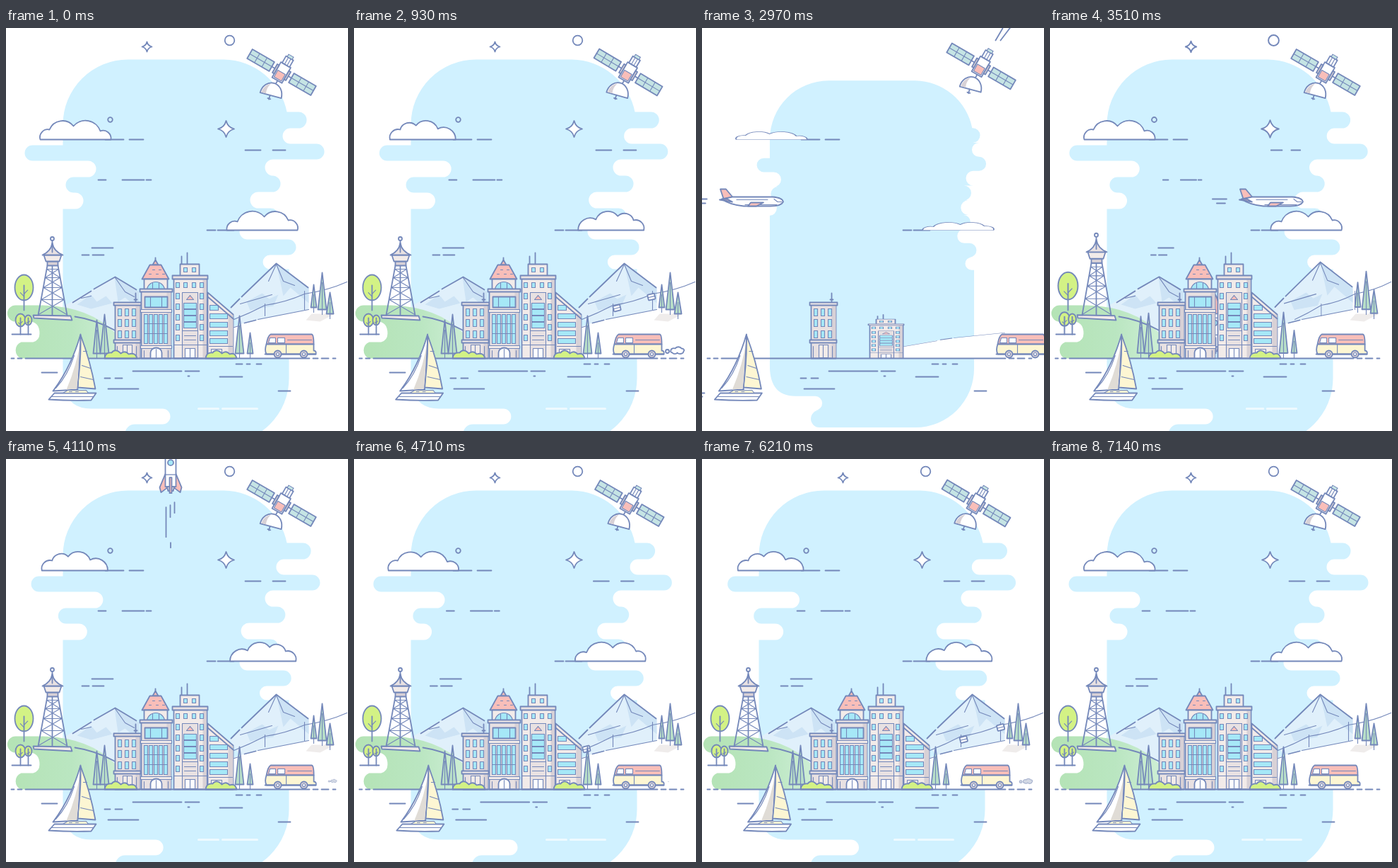
These frames come from a looping animation (484x569 px, 7.17 s). An HTML page:

```html
<!DOCTYPE html>
<html lang="en">
<head>
<meta charset="utf-8">
<title>City by the bay</title>
<style>
html, body { margin: 0; width: 100%; height: 100%; overflow: hidden; background: #fff; }
svg { display: block; width: 484px; height: 569px; fill: none; stroke: #7488ba; stroke-width: 1.8; stroke-linecap: round; stroke-linejoin: round; }
.thin { stroke-width: 1.1; }
.flat { stroke: none; }
.sky { fill: #d0f1ff; }
.white { fill: #fff; }
.wall { fill: #e8e1e2; }
.pale { fill: #f2ebe9; }
.shade { fill: #d8d1d6; }
.glass { fill: #a6e8f7; }
.pink { fill: #f9beb9; }
.cream { fill: #fdf6d3; }
.leaf { fill: #d3f285; }
.pine { fill: #b8dfc8; }
.snow { fill: #e0f0fb; }
.ice { fill: #cde3f5; }
.panel { fill: #c5e4e4; }
.sail { fill: #e0dcd6; }
.sand { fill: #efeceb; }
.meadow { fill: url(#meadow); }
</style>
</head>
<body>
<svg id="stage" viewBox="-.5 -.5 484 569"></svg>
<script>
const LOOP = 7170, SWAY = 2700, CUT = 2480, SETTLED = 4470;
const stage = document.getElementById('stage');

const line = (y, ...xs) => {
  let d = '';
  for (let i = 0; i < xs.length; i += 2) d += `M${xs[i]} ${y}H${xs[i + 1]}`;
  return `<path d="${d}"/>`;
};
const rect = (c, x, y, w, h, r = 0) => `<rect class="${c}" x="${x}" y="${y}" width="${w}" height="${h}" rx="${r}"/>`;
const path = (c, d) => `<path class="${c}" d="${d}"/>`;
const dot = (c, x, y, r) => `<circle class="${c}" cx="${x}" cy="${y}" r="${r}"/>`;
const grid = (c, xs, ys, w, h) => ys.map(y => xs.map(x => rect(c, x, y, w, h)).join('')).join('');
const group = (id, body) => `<g id="${id}">${body}</g>`;
// mode: y = grow upward, x = widen, s = scale both ways
const enter = (start, mode, x, y, body) =>
  `<g data-start="${start}" data-mode="${mode}" data-x="${x}" data-y="${y}">${body}</g>`;

const star = (x, y, r) => {
  const k = r * .2;
  return path('white', `M${x} ${y - r}Q${x + k} ${y - k} ${x + r} ${y}Q${x + k} ${y + k} ${x} ${y + r}Q${x - k} ${y + k} ${x - r} ${y}Q${x - k} ${y - k} ${x} ${y - r}Z`);
};
const pine = (x, top, base, w) => enter(3180 + x % 7 * 25, 'y', x, base,
  path('pine', `M${x} ${top}L${x + w} ${base - 7}H${x - w}Z`) + path('thin', `M${x} ${top + 14}V${base}`));
const tree = (x, y, rx, ry, base) => enter(3300, 's', x, base,
  `<ellipse class="leaf" cx="${x}" cy="${y}" rx="${rx}" ry="${ry}"/>` +
  path('', `M${x} ${y - 3}V${base}`) +
  path('thin', `M${x} ${y + ry * .5}l${rx * .4} ${-ry * .3}M${x} ${y + ry * .7}l${-rx * .4} ${-ry * .3}`));

const mountains =
  enter(3080, 'y', 140, 410,
    path('flat snow', 'M78 394L153 351L188 372V430H150L78 410Z') +
    path('flat ice', 'M153 351L188 372V397L168 380L158 386Z') +
    path('flat ice', 'M100 390L120 376L128 386L141 378L150 388L120 396Z') +
    path('', 'M94 387L120 371M124 368L154 351L184 369') + path('thin', 'M154 352L168 372L181 379M106 381L120 378')) +
  enter(3120, 'y', 375, 415,
    path('flat snow', 'M316 396L382 332L428 366V405L330 418Z') +
    path('flat ice', 'M382 332L428 366V388L402 366L392 378Z') +
    path('flat ice', 'M340 386L362 374L372 382L385 376L378 392L345 398Z') +
    path('', 'M318 394L330 382M333 379L382 332L427 366') + path('thin', 'M382 333L392 357L408 363M382 333L371 357M331 389L376 376'));

const hills =
  enter(3050, 'y', 75, 466,
    path('flat meadow', 'M13 391H52Q118 393 154 430V466H21A11 12 0 0 1 21 443H38Q47 440 47 431Q47 414 32 414H13A11 11 0 0 1 13 391Z') +
    path('', 'M97 407Q125 411 153 426M8 432H35')) +
  enter(2910, 'y', 380, 466,
    path('flat white', 'M284 466V434L340 415L428 397L482 385V466Z') +
    path('thin', 'M285 434L332 419M356 411L428 397') + path('', 'M337 416L353 412') +
    path('flat sand', 'M424 412L432 403H465L444 414Z'));

const lattice = [340, 352, 366, 383].map((y, i) => {
  const h = [12, 14, 17, 21][i], a = (y - 335) * .18, b = (y + h - 335) * .18;
  return `M${58 - a} ${y}L${73 + b} ${y + h}M${73 + a} ${y}L${58 - b} ${y + h}M${58 - a} ${y}H${73 + a}`;
}).join('');
const tower = enter(3150, 'y', 65, 411,
  path('pale', 'M38 405L91 406L93 412L39 409Z') + path('', 'M58 335L45 405M73 335L86 405M65 335V405') + path('thin', lattice) +
  rect('shade', 58, 329, 15, 6) + path('pale', 'M53 320H78L75 329H56Z') + path('wall', 'M65 303Q63 315 51 320H80Q67 315 65 303Z') +
  path('', 'M65 300V316') + dot('white', 65, 297, 2.5));

const cable = enter(3300, 'x', 482, 400,
  path('thin', 'M322 411Q345 402 366 391Q395 387 422 375Q455 370 482 358M366 406V389M422 397V371'));

const b1 = enter(2520, 'y', 171, 466,
  path('', 'M183 387V374M181 383H185') + rect('wall', 154, 390, 35, 76) + rect('flat shade', 183, 391, 6, 74) +
  rect('pale', 152, 387, 39, 4) + grid('glass thin', [158, 168, 178], [396, 411, 427], 5, 10) +
  rect('pale', 152, 440, 38, 4) + rect('pale thin', 165, 447, 13, 18) + path('thin', 'M171 447V465M157 449V465M184 449V465'));

const b2 = enter(3010, 'y', 212, 466,
  path('', 'M211 334V324') + path('pink', 'M211 327L215 334H207Z') + path('pink', 'M203 334H219L230 354H192Z') +
  path('thin', 'M207 341h3M216 341h3M202 347h3M212 347h3M221 347h3') +
  rect('pale', 195, 354, 33, 16) + path('glass thin', 'M199 370a12.5 12 0 0 1 25 0Z') + path('thin', 'M207 359V370M216 359V370') +
  rect('wall', 191, 371, 42, 95) + rect('flat shade', 227, 372, 6, 93) + rect('pale', 189, 368, 46, 4) +
  rect('glass', 196, 379, 32, 15) + path('thin', 'M204 379V394M220 379V394') + rect('pale thin', 190, 397, 44, 4) +
  grid('glass thin', [195, 202, 209, 216, 223], [404], 5, 41) + path('thin', 'M195 417H228M195 431H228') +
  rect('pale thin', 190, 448, 44, 4) + path('white', 'M204 465V458a8 7 0 0 1 16 0V465') + path('thin', 'M212 453V465M195 455V465M229 455V465'));

const wing = enter(3060, 'y', 303, 466,
  path('pale', 'M285 373L321 404V466H285Z') + path('flat shade', 'M314 402L321 405V465H314Z') +
  [391, 403, 415, 427, 438].map((y, i) => path('glass thin', `M288 ${y}H${i ? 313 : 300}V${y + 7}H288Z`)).join('') +
  path('', 'M285 379L321 410') + path('thin', 'M287 449H320') + rect('pale thin', 290, 453, 15, 12));

const b3 = enter(2925, 'y', 260, 466,
  path('', 'M248 333V322M256 332V317') + rect('pale', 246, 333, 27, 17) +
  grid('glass thin', [251, 263], [338], 5, 6) + rect('pale', 237, 353, 47, 113) + rect('flat shade', 278, 355, 5, 110) +
  rect('wall', 235, 349, 50, 5) + grid('glass thin', [240, 251, 263, 274], [359], 5, 7) +
  grid('glass thin', [240, 274], [374, 389, 404, 418, 433], 5, 8) +
  rect('wall thin', 249, 373, 22, 92) + path('pink thin', 'M260 377L265 383H255Z') +
  grid('glass thin', [251], [388, 397, 406, 415], 18, 8) + path('thin', 'M249 427H271M252 434H268M252 440H268M237 447H284') +
  rect('white thin', 253, 452, 14, 13) + path('thin', 'M260 452V465'));

const bush = (x, w) => enter(3350, 'y', x, 466,
  path('leaf', `M${x - w} 466q1-9 10-8q5-7 13 1q6-5 11 1q${w * 2 - 36}-3 ${w * 2 - 34} 6Z`));

const boat =
  path('cream', 'M105 433Q119 470 126 509L101 507Z') +
  path('white', 'M105 432Q92 478 66 512L100 510Q106 470 105 432Z') +
  path('flat sail', 'M105 440L100 509L85 510Q100 475 105 440Z') +
  path('thin', 'M105 432L101 515M109 456H114M107 476L119 480M105 492L123 496M70 508Q87 490 96 462') +
  path('white', 'M60 524L68 515H127L120 525Q90 526 60 524Z') + path('cream thin', 'M80 515L87 511H113L116 515Z') +
  path('thin', 'M65 520H123M89 513h4M98 513h4');

const van =
  path('pink', 'M374 432H432Q435 432 435 446H368Q370 434 374 432Z') +
  path('cream', 'M368 446H435V455Q439 455 438 460H368Q365 454 368 446Z') +
  path('white thin', 'M373 437H381V444H371Z') + rect('white thin', 384, 437, 10, 7) + path('thin', 'M398 440H432M396 446V459') +
  path('', 'M366 460H438') + dot('shade', 384, 460, 5) + dot('shade', 421, 460, 5) + dot('white thin', 384, 460, 2) + dot('white thin', 421, 460, 2);

const panel = x => rect('panel', x, -7.5, 36, 15) + path('thin', `M${x} 0h36M${x + 12}-7v14M${x + 24}-7v14`);
const craft = `<g transform="translate(389.5 62) rotate(30)">${path('', 'M-16 0H16M1 13V20')}${panel(-52)}${panel(16)}` +
  rect('white', -8, -12, 16, 25) + rect('pink thin', -6, 0, 12, 11) + rect('shade', -11, -7, 3, 14) + rect('shade', 8, -7, 3, 14) +
  rect('white', -6, -23, 12, 11) + rect('panel thin', -4, -27, 8, 4) + path('thin', 'M-2-23V-12M2-23V-12') +
  `<g transform="translate(3 36) rotate(-15)">${path('white', 'M-15.5 0A15.5 18 0 0 1 15.5 0Z')}${path('flat shade', 'M-14-1A15 17 0 0 1-4-16Q-9-8-7-1Z')}${path('', 'M-1 0V6M-3 5H1')}</g></g>`;

const plane =
  path('pink', 'M25 227H33L43 239L30 242Z') +
  path('white', 'M27 241L42 238H99Q113 239 114 245Q111 251 96 251H58Q38 249 27 241Z') +
  path('thin', 'M48 242H92M101 241L106 245H112M60 249H105') + path('pink', 'M68 246H86L76 251H64Z') + path('pink', 'M24 242L35 241L42 245Z') +
  path('', 'M6 241H-14M4 247H-8');

const rocket =
  path('pink', 'M225 57L217 76L219 83L227 77ZM240 57L248 76L246 83L238 77Z') +
  path('white', 'M225 75V28Q225 9 232.5 0Q240 9 240 28V75Z') + path('pink', 'M225 28Q226 9 232.5 0Q239 9 240 28Z') +
  path('shade', 'M227 75H238L236 81H229Z') + dot('glass', 232.5, 41, 4) + path('thin', 'M225 34H240M225 58H240') + path('pink', 'M231 62H234V84H231Z') +
  path('', 'M226 104V146M232 101V118M238 97V112M232.5 154V161');

const car = id => group(id, `<g transform="rotate(-14)">${rect('white', -5, -2, 10, 8, 1)}${path('thin', 'M-5 2H5')}</g>`);

stage.innerHTML =
  `<defs><linearGradient id="meadow"><stop stop-color="#b4e3b5"/><stop offset=".6" stop-color="#bae6c1"/><stop offset="1" stop-color="#cdeed4"/></linearGradient>
  <clipPath id="above"><path d="M0-200H484V466H0Z"/></clipPath><clipPath id="span"><path d="M322 300H432V466H322Z"/></clipPath></defs>` +
  `<path id="blob" class="flat sky"/>` +
  enter(3250, 's', 199, 26, star(199, 26, 7)) + enter(3300, 's', 311, 142, star(311, 142, 11.5)) +
  enter(3280, 's', 316, 17, dot('', 316, 17, 6.8)) + enter(3320, 's', 147, 129, dot('', 147, 129, 3.3)) +
  enter(3350, 'x', 240, 0, group('breeze', line(214, 130, 141, 164, 195, 198, 205) + line(172, 338, 360, 377, 395) + line(310, 121, 151) + line(320, 107, 117, 122, 138))) +
  enter(2520, 'x', 170, 0, line(157, 140, 166, 174, 194)) + enter(2520, 'x', 330, 0, line(285, 284, 296, 299, 322)) +
  enter(2925, 'y', 96, 157, path('white cloud', '')) +
  enter(2925, 'y', 360, 285, `<g transform="translate(460 128) scale(-1 1)">${path('white cloud', '')}</g>`) +
  `<g clip-path="url(#above)">${group('rocket', rocket)}</g>` +
  mountains + hills + cable + `<g clip-path="url(#span)">${car('carA')}${car('carB')}</g>` +
  tower + tree(25, 366, 13, 18, 398) + tree(20, 412, 7, 9, 432) + tree(31, 412, 5, 7, 432) +
  pine(447, 345, 404, 6) + pine(435, 362, 401, 4) + pine(458, 373, 410, 5) +
  pine(128, 412, 466, 5) + pine(139, 404, 466, 6) + pine(330, 406, 466, 6) + pine(345, 430, 466, 4) +
  wing + b1 + b2 + b3 + bush(162, 23) + bush(304, 22) +
  enter(2480, 'x', 240, 466, line(466, 7, 11, 16, 22, 27, 429, 434, 441, 446, 456, 462, 466)) +
  `<g stroke="#fff" opacity=".65" stroke-width="3">${enter(3300, 'x', 310, 0, line(537, 272, 300, 306, 355))}</g>` +
  enter(2500, 'x', 250, 500, group('ripples', line(484, 179, 248, 253, 273) + line(494, 139, 147, 154, 164) + line(509, 144, 187) + line(491, 257, 259)) +
    line(492, 302, 334) + line(474, 325, 334, 340, 345, 354, 361) + line(512, 385, 402)) +
  enter(3200, 'x', 60, 486, line(486, 50, 72)) +
  group('van', van) + group('smoke', dot('', -13, 1, 2.5) + path('', 'M-8 0a4 3 0 0 1 6-3a5 4 0 0 1 9 0a3.5 2.5 0 0 1 3 4a5 4 0 0 1-9 2a4 3 0 0 1-7 0a3 2 0 0 1-2-3Z')) +
  group('boat', boat) + group('wake', line(515, -10, 3) + line(520, -10, 0)) + group('plane', plane) + group('craft', craft) +
  group('streaks', path('', 'M415 17L425 0M422 17L438-4')) +
  `<path id="beamA"/><path id="beamB"/>`;

const part = id => document.getElementById(id);
const move = (id, x, y = 0, more = '') => part(id).setAttribute('transform', `translate(${x} ${y}) ${more}`);
const show = (id, alpha) => part(id).setAttribute('opacity', alpha);
const clamp = u => Math.max(0, Math.min(1, u));
const mix = (a, b, u) => a + (b - a) * u;
const cubicOut = u => 1 - (1 - u) ** 3;
const backOut = u => u <= 0 ? 0 : 1 + 2.7 * (u - 1) ** 3 + 1.7 * (u - 1) ** 2;
const entrants = [...document.querySelectorAll('[data-start]')];
const clouds = [...document.querySelectorAll('.cloud')];

// Cloud dips at rest and at full sway, joined by arcs
const calm = [[48, 157], [61, 143], [95, 138], [133, 145], [148, 157]];
const blown = [[51, 157], [66, 143], [85, 137], [114, 141], [142, 157]];

function cloud(w) {
  const dips = calm.map(([x, y], i) => [mix(x, blown[i][0], w), mix(y, blown[i][1], w)]);
  return dips.reduce((d, [x, y], i) => {
    if (!i) return `M${x} ${y}`;
    const r = Math.hypot(x - dips[i - 1][0], y - dips[i - 1][1]) * .58;
    return `${d}A${r} ${r} 0 0 1 ${x} ${y}`;
  }, '') + 'Z';
}

// Bands of the backdrop: top, bottom, resting edge, sway, +1 bulges outward
const rightBands = [
  [118, 141, 425, 8, 1], [141, 163, 391, -12, -1], [163, 185, 450, -8, 1], [185, 208, 366, 0, -1], [208, 231, 388, 9, 1],
  [231, 254, 345, -17, -1], [254, 276, 385, 0, 1], [276, 298, 330, 0, -1], [298, 320, 410, -9, 1], [320, 340, 363, -6, -1]];
const leftBands = [
  [559, 586, 168, -18, 1, 130], [537, 559, 232, -13, -1, 120], [232, 255, 109, 7, -1, 80],
  [210, 232, 84, -14, 1, 80], [187, 210, 127, 13, -1, 80], [165, 187, 26, 12, 1, 80]];

function backdrop(w, open) {
  let d = 'M172 44H308A92 92 0 0 1 397 118';
  for (const [y0, y1, x, sway, out] of rightBands) {
    const r = (y1 - y0) / 2, e = 400 + (x + sway * w - 400) * open - out * r;
    d += `H${e}A${r} ${r} 0 0 ${out > 0 ? 1 : 0} ${e} ${y1}`;
  }
  d += 'H400V494A92 92 0 0 1 308 586';
  leftBands.forEach(([y0, y1, x, sway, out, base], i) => {
    const r = (y1 - y0) / 2, e = base + (x + sway * w - base) * open + out * r;
    if (i === 2) d += 'H120Q80 537 80 490V255';
    d += `H${e}A${r} ${r} 0 0 ${out > 0 ? 1 : 0} ${e} ${y0}`;
  });
  return d + 'H80V136A92 92 0 0 1 172 44Z';
}

function draw(t) {
  const full = t < CUT;
  const age = (start, dur) => full ? 1 : clamp((t - start) / dur);
  const idle = full ? t : Math.max(0, t - SETTLED);
  const w = (1 - Math.cos(2 * Math.PI * idle / SWAY)) / 2;

  for (const el of entrants) {
    const { start, mode, x, y } = el.dataset;
    const u = age(+start, 450), s = mode === 'x' ? cubicOut(u) : backOut(u);
    el.setAttribute('transform', `translate(${x} ${y}) scale(${mode === 'y' ? 1 : s} ${mode === 'x' ? 1 : s}) translate(${-x} ${-y})`);
    el.setAttribute('visibility', u > 0 ? 'visible' : 'hidden');
  }

  const swell = !full && t > 3570 && t < SETTLED ? .42 * (1 - Math.cos(2 * Math.PI * (t - 3570) / 900)) : w;
  part('blob').setAttribute('d', backdrop(swell, cubicOut(age(2840, 900))));
  move('blob', 240, 353, `scale(${cubicOut(age(CUT, 907))}) translate(-240 -353)`);
  for (const el of clouds) el.setAttribute('d', cloud(swell));

  move('breeze', 5 * w);
  move('ripples', -4 * w);

  const rest = (start, dur) => (1 - age(start, dur)) ** 3;
  const drop = rest(CUT, 875);
  move('boat', -140 * rest(CUT, 1500) - 1.8 * w);
  move('van', 130 * rest(CUT, 1800));
  move('craft', 60 * drop - 2.5 * w, -100 * drop, `rotate(${w} 390 62)`);
  show('streaks', !full && t < 3120 ? 1 : 0);
  move('streaks', 60 * (drop - .085), -100 * (drop - .085));
  show('wake', !full && t < 3150 ? 1 : 0);

  move('plane', (t - 2970) * .45);
  show('plane', t > 2650 && t < 4100 ? 1 : 0);
  move('rocket', 0, 375 - 410 * ((t - 3500) / 610) ** 2);
  show('rocket', t > 3500 && t < 4500 ? 1 : 0);

  const q = (full ? t : t - SETTLED + SWAY) % SWAY;
  const rise = clamp((q - 200) / 600), fade = clamp((q - 1000) / 1600);
  move('smoke', 444 + 12 * rise + 8 * fade, 455 - fade, `scale(${rise * (1 - .65 * fade)})`);
  part('smoke').setAttribute('fill', q < 1500 ? '#fff' : '#d3d9e5');
  part('smoke').setAttribute('stroke', q < 1500 ? '#7488ba' : '#aab5d0');
  show('smoke', (full || t > 3800) && q > 200 && q < 2600 ? 1 : 0);

  const ride = (id, x) => move(id, x, 409 - (x - 322) * .325);
  ride('carA', 371 + (q - 930) * .0625);
  ride('carB', 420 - (q - 930) * .0625);
  for (const id of ['carA', 'carB']) show(id, full || t >= SETTLED ? 1 : 0);

  const pulse = (q - 1900) / 600, on = (full || t >= SETTLED) && pulse > 0 && pulse < 1;
  const r = 4 + 9 * clamp(pulse), alpha = on ? 1 - pulse * .7 : 0;
  part('beamA').setAttribute('d', `M${65 - r} 298A${r} ${r} 0 0 1 ${65 + r} 298`);
  part('beamB').setAttribute('d', `M${366 - r} 100A${r} ${r} 0 0 0 ${366 + r * .3} ${100 + r}`);
  show('beamA', alpha);
  show('beamB', alpha);
}

const begin = performance.now();
function tick() {
  draw((performance.now() - begin) % LOOP);
  requestAnimationFrame(tick);
}
tick();
</script>
</body>
</html>
```
